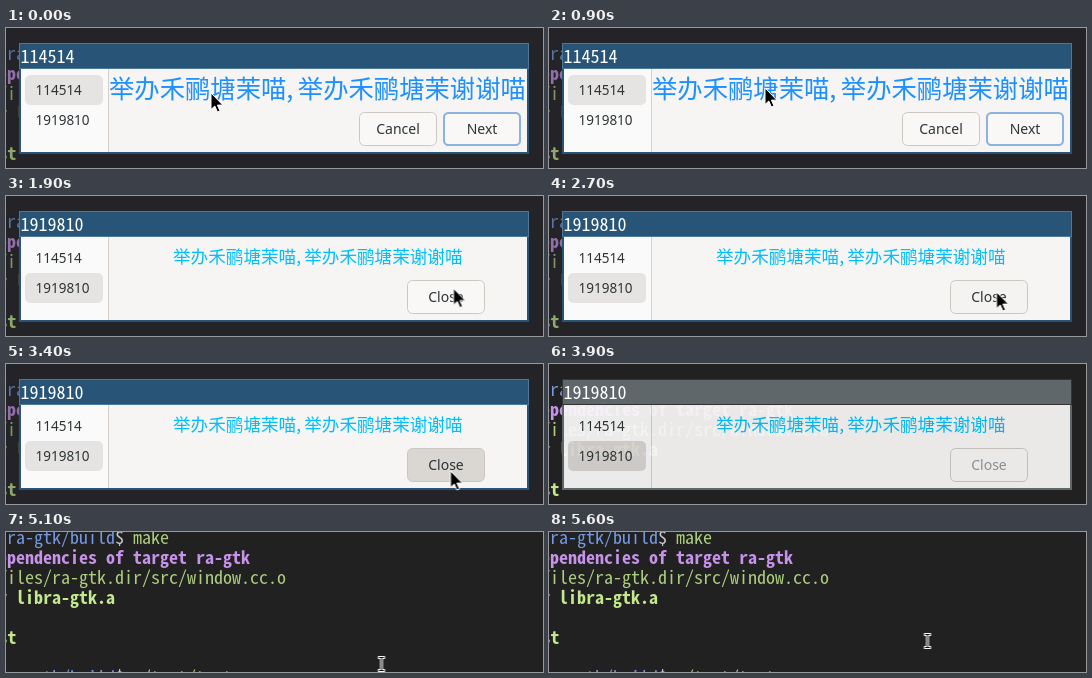
Animation, 537 px wide and 140 px high, one loop 5700 ms. Source, as an HTML page:

```html
<!DOCTYPE html>
<html lang="zh">
<head>
<meta charset="utf-8">
<title>Assistant dialog</title>
<style>
html, body { margin: 0; width: 100%; height: 100%; overflow: hidden; background: #212121; }
svg { display: block; width: 537px; height: 140px; }
text { white-space: pre; }

/* Everything holds its pose until the next 100 ms tick. */
.anim { animation: 5.7s step-end infinite; }

.mono { font: 18px "Noto Sans Mono CJK SC", "Noto Sans Mono", monospace; }
.ui { font: 14px "Noto Sans", "Open Sans", sans-serif; fill: #2e3436; }
.ui .button { text-anchor: middle; }
.ui .step { font-size: 13.5px; }
.cjk { font-family: "Noto Sans CJK SC", "Noto Sans", sans-serif; word-spacing: -.045em; }
.large { font-size: 25.34px; fill: #1e90ff; }
.small { font-size: 17.6px; fill: #00bfff; }
.thin { fill-opacity: .87; }
.bold { font-weight: bold; }
.blue { fill: #82aaff; }
.purple { fill: #c792ea; }
.green { fill: #c3e88d; }
.plain { fill: #e0e0e0; }

.backdrop { animation-name: backdrop; }
.lines { animation-name: brighten, scroll; }
.window { animation-name: window; }
.content { animation-name: content; }
.border { animation-name: border; }
.frame { animation-name: frame; }
.title { animation-name: title; }
.sidebar { animation-name: sidebar; }
.first { animation-name: first; }
.second { animation-name: second; }
.row1 { animation-name: row1; }
.row2 { animation-name: row2; }
.next { animation-name: next; }
.ring { animation-name: ring; }
.close { animation-name: close; }
.close-label { animation-name: close-label; }
.arrow { animation-name: arrow; }
.beam { animation-name: beam; }

@keyframes backdrop { 0% { fill: #242327; } 64.91%, 100% { fill: #212121; } }
@keyframes brighten { 0% { opacity: .68; } 64.91%, 100% { opacity: 1; } }
@keyframes scroll { 0% { transform: none; } 73.68%, 100% { transform: translateY(-20px); } }
@keyframes window { 0% { visibility: visible; } 71.92%, 100% { visibility: hidden; } }
@keyframes content { 0% { opacity: 1; } 64.91%, 100% { opacity: .95; } }
@keyframes border { 0% { stroke: #285577; } 64.91%, 100% { stroke: #5f676a; } }
@keyframes frame { 0% { fill: #4c7899; } 64.91%, 100% { fill: #333; } }
@keyframes title { 0% { fill: #285577; } 64.91%, 100% { fill: #5f676a; } }
@keyframes sidebar { 0% { fill: #fbfafa; } 66.66%, 100% { fill: #f8f7f7; } }
@keyframes first { 0% { visibility: inherit; } 31.57%, 100% { visibility: hidden; } }
@keyframes second { 0% { visibility: hidden; } 31.57%, 100% { visibility: inherit; } }
@keyframes row1 { 0% { opacity: 1; } 31.57% { opacity: .4; } 33.33%, 100% { opacity: 0; } }
@keyframes row2 {
  0% { opacity: 0; fill: #e6e4e2; }
  31.57% { opacity: .6; fill: #e6e4e2; }
  33.33% { opacity: 1; fill: #e6e4e2; }
  64.91% { opacity: 1; fill: #dedbd9; }
  66.66%, 100% { opacity: 1; fill: #d6d3d0; }
}
@keyframes next { 0% { fill: #f9f8f7; } 22.8% { fill: #f2f0ee; } 24.56%, 100% { fill: #e6e3e0; } }
@keyframes ring { 0% { opacity: 1; } 24.56%, 100% { opacity: 0; } }
@keyframes close {
  0% { fill: #f9f8f7; }
  47.36% { fill: #f5f3f2; }
  59.64% { fill: #dad6d2; }
  61.4% { fill: #e6e3e0; }
  63.15% { fill: #f5f3f2; }
  66.66%, 100% { fill: #f6f5f4; }
}
@keyframes close-label {
  0% { fill: #2e3436; }
  64.91% { fill: #53585a; }
  66.66% { fill: #75797a; }
  68.42%, 100% { fill: #929595; }
}
@keyframes arrow {
  0% { transform: translate(205px, 65px); visibility: visible; }
  15.78% { transform: translate(216px, 60px); visibility: visible; }
  17.54% { transform: translate(268px, 56px); visibility: visible; }
  19.29% { transform: translate(342px, 59px); visibility: visible; }
  21.05% { transform: translate(405px, 72px); visibility: visible; }
  22.8% { transform: translate(438px, 87px); visibility: visible; }
  24.56% { transform: translate(447.5px, 92.5px); visibility: visible; }
  47.36% { transform: translate(447.5px, 96px); visibility: visible; }
  49.12% { transform: translate(446px, 102px); visibility: visible; }
  50.87% { transform: translate(444.5px, 107px); visibility: visible; }
  63.15% { transform: translate(440px, 116px); visibility: visible; }
  64.91%, 100% { transform: translate(440px, 145px); visibility: hidden; }
}
@keyframes beam {
  0% { transform: translate(375.5px, 160px); }
  89.47% { transform: translate(375.5px, 132px); }
  92.98% { transform: translate(375.5px, 129px); }
  94.73% { transform: translate(376.5px, 120px); }
  96.49% { transform: translate(377.5px, 112px); }
  98.24%, 100% { transform: translate(378.5px, 109px); }
}
</style>
</head>
<body>
<svg viewBox="0 0 537 140">
  <rect class="anim backdrop" width="537" height="140" fill="#212121"/>

  <g class="anim lines mono">
    <text x="-8" y="32" class="blue thin">/ra-gtk/build<tspan class="plain">$ </tspan><tspan class="green">make</tspan></text>
    <text x="-8" y="52" class="purple bold">ependencies of target ra-gtk</text>
    <text x="-8" y="72" class="green thin">files/ra-gtk.dir/src/window.cc.o</text>
    <text x="-8" y="92" class="green bold">y libra-gtk.a</text>
    <text x="-7.5" y="132" class="green bold">st</text>
    <text x="-8" y="172" class="blue thin">/ra-gtk/build<tspan class="plain">$ </tspan><tspan class="green">./test/test</tspan></text>
  </g>

  <g class="anim window">
    <rect class="anim border" x="14" y="40" width="508" height="85" fill="none" stroke-width="2"/>
    <rect class="anim frame" x="13" y="15" width="510" height="26"/>
    <rect class="anim title" x="14" y="16" width="508" height="24"/>
    <g class="mono" fill="#fff">
      <text class="anim first" x="14.5" y="35">114514</text>
      <text class="anim second" x="14.5" y="35">1919810</text>
    </g>

    <g class="anim content">
      <rect x="15" y="41" width="506" height="83" fill="#f6f5f4"/>
      <rect class="anim sidebar" x="15" y="41" width="87" height="83"/>
      <rect x="102" y="41" width="1" height="83" fill="#d5d0cc"/>
      <rect class="anim row1" x="19" y="47" width="78" height="30" rx="5" fill="#e6e4e2"/>
      <rect class="anim row2" x="19" y="77" width="78" height="30" rx="5"/>

      <g class="ui">
        <text class="step" x="29.5" y="67">114514</text>
        <text class="step" x="29.5" y="97">1919810</text>
      </g>

      <g class="anim first">
        <text class="cjk large" x="103" y="70">举办禾鹂塘茉喵, 举办禾鹂塘茉谢谢喵</text>
        <g class="ui">
          <rect x="353.5" y="84.5" width="77" height="33" rx="5" fill="#f9f8f7" stroke="#cdc7c2"/>
          <rect class="anim next" x="437.5" y="84.5" width="77" height="33" rx="5" stroke="#cdc7c2"/>
          <rect class="anim ring" x="438" y="85" width="76" height="32" rx="4.5" fill="none" stroke="#8bb3e2" stroke-width="2"/>
          <text class="button" x="392" y="106">Cancel</text>
          <text class="button" x="476" y="106">Next</text>
        </g>
      </g>

      <g class="anim second">
        <text class="cjk small" x="167" y="66.5">举办禾鹂塘茉喵, 举办禾鹂塘茉谢谢喵</text>
        <g class="ui">
          <rect class="anim close" x="401.5" y="84.5" width="77" height="33" rx="5" stroke="#cdc7c2"/>
          <text class="anim close-label button" x="440" y="106">Close</text>
        </g>
      </g>
    </g>
  </g>

  <path class="anim arrow" d="M0 0V16.5l3.8-3.5 2.6 6 2.6-1.1-2.6-5.8h5.4z" fill="#000" stroke="#fff"/>
  <g class="anim beam" fill="none">
    <path d="M-3.5 -6.5H3.5M-3.5 6.5H3.5M0 -6.5V6.5" stroke="#fff" stroke-width="3"/>
    <path d="M-2.5 -6.5H2.5M-2.5 6.5H2.5M0 -6.5V6.5" stroke="#111"/>
  </g>
</svg>
</body>
</html>
```
